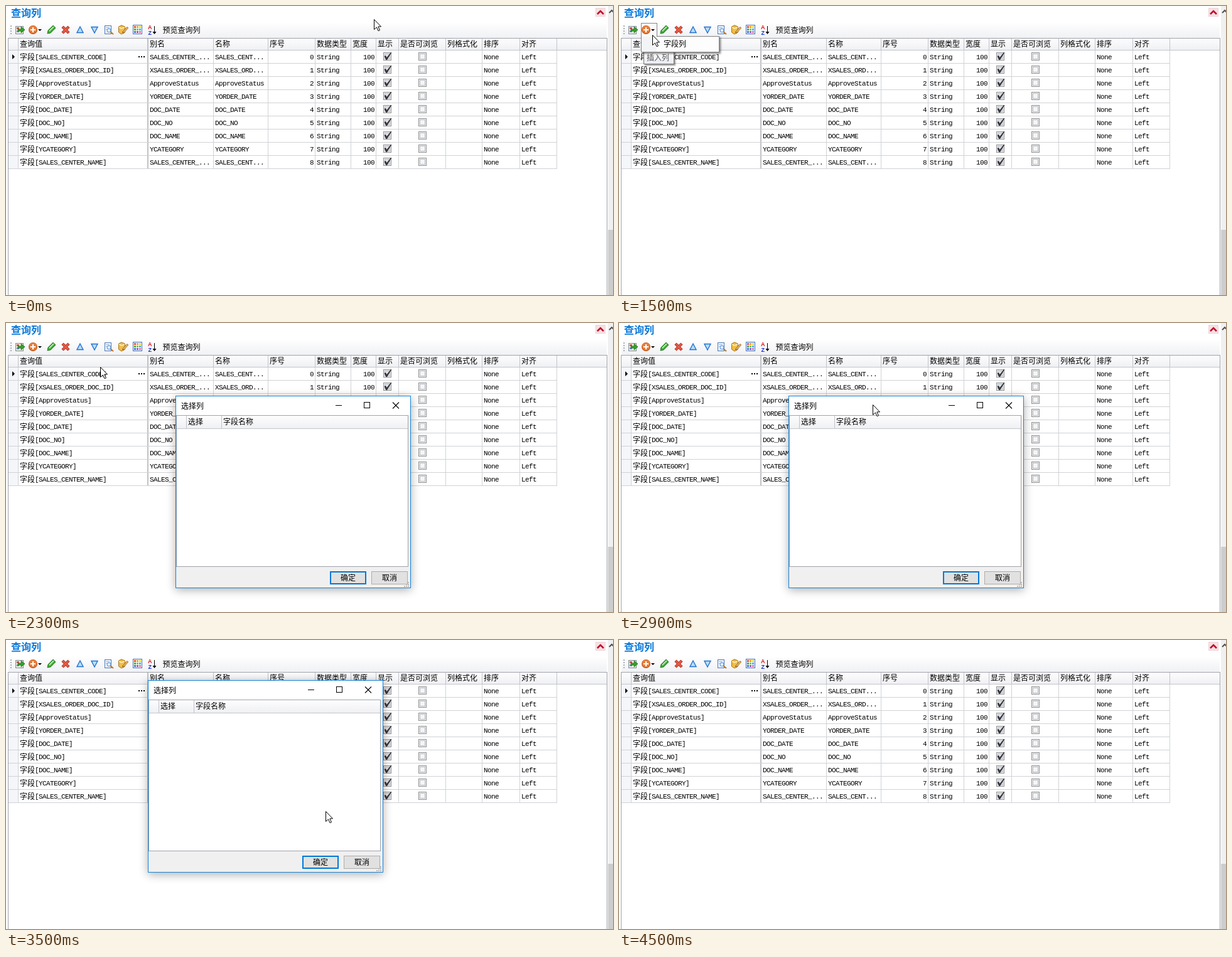
Recreate the animation shown at these times as an HTML page with a canvas. Size 967 by 461 pixels, loop 5.1 s.

```html
<!DOCTYPE html>
<html lang="zh">
<head>
<meta charset="utf-8">
<style>
html, body { margin: 0; width: 100%; height: 100%; overflow: hidden; background: #fff; }
canvas { display: block; }
</style>
</head>
<body>
<canvas id="stage" width="967" height="461"></canvas>
<script>
const LOOP = 5100, STEP = 100;
const CJK = '"Noto Sans CJK SC", "Noto Sans CJK", sans-serif';
const MONO = '"Liberation Mono", monospace';
const COLS = [19, 225, 330, 417, 492, 549, 589, 625, 700, 758, 818, 877];
const HEADS = ['查询值', '别名', '名称', '序号', '数据类型', '宽度', '显示', '是否可浏览', '列格式化', '排序', '对齐'];
const FIELDS = ['SALES_CENTER_CODE', 'XSALES_ORDER_DOC_ID', 'ApproveStatus', 'YORDER_DATE', 'DOC_DATE',
  'DOC_NO', 'DOC_NAME', 'YCATEGORY', 'SALES_CENTER_NAME'];

// Pointer stops: time, x, y
const POINTER = [
  [0, 586, 21], [100, 420, 26], [200, 150, 36], [300, 42, 39],
  [1400, 47, 42], [1500, 53, 46], [1600, 62, 51], [1700, 74, 56], [1800, 82, 58],
  [2300, 150, 70], [2400, 290, 92], [2500, 386, 107], [2600, 395, 116], [2800, 400, 124], [2900, 404, 130],
  [3000, 376, 92], [3100, 360, 78], [3300, 399, 99], [3400, 580, 170], [3500, 509, 273], [3600, 497, 313],
  [3700, 498, 335], [3800, 500, 341], [4100, 610, 310], [4200, 740, 265], [4300, 860, 225], [4400, 942, 200],
  [4500, 980, 190]
];

const stage = document.getElementById('stage').getContext('2d');
let ctx = stage;

const clamp = v => Math.max(0, Math.min(1, v));

function rect(x, y, w, h, color) {
  ctx.fillStyle = color;
  ctx.fillRect(x, y, w, h);
}

function box(x, y, w, h, border, fill, line = 1) {
  rect(x, y, w, h, border);
  rect(x + line, y + line, w - 2 * line, h - 2 * line, fill);
}

function shade(y, h, from, to) {
  const g = ctx.createLinearGradient(0, y, 0, y + h);
  g.addColorStop(0, from);
  g.addColorStop(1, to);
  return g;
}

function poly(points, fill, stroke, width = 1, closed = true) {
  ctx.beginPath();
  for (let i = 0; i < points.length; i += 2) ctx.lineTo(points[i], points[i + 1]);
  if (closed) ctx.closePath();
  if (fill) { ctx.fillStyle = fill; ctx.fill(); }
  if (stroke) { ctx.strokeStyle = stroke; ctx.lineWidth = width; ctx.stroke(); }
}

const path = (points, stroke, width) => poly(points, null, stroke, width, false);

function disc(x, y, r, fill) {
  ctx.beginPath();
  ctx.arc(x, y, r, 0, 7);
  ctx.fillStyle = fill;
  ctx.fill();
}

function write(s, x, y, font, color, align = 'left', spacing = '0px') {
  ctx.font = font;
  ctx.fillStyle = color;
  ctx.textAlign = align;
  ctx.textBaseline = 'alphabetic';
  ctx.letterSpacing = spacing;
  ctx.fillText(s, x, y);
}

const label = (s, x, y, color = '#000', align) => write(s, x, y + 4.5, '12px ' + CJK, color, align);
const code = (s, x, y) => write(s, x, y + 4, '11px ' + MONO, '#000', 'left', '-0.6px');
const codeRight = (s, x, y) => code(s, x - 6 * s.length, y);
const shorten = (s, n) => s.length > n ? s.slice(0, n - 3) + '...' : s;

function shadowed(blur, dx, dy, color, draw) {
  ctx.save();
  ctx.shadowBlur = blur;
  ctx.shadowOffsetX = dx;
  ctx.shadowOffsetY = dy;
  ctx.shadowColor = color;
  draw();
  ctx.restore();
}

function pencil(x, y, body, edge) {
  poly([x, y + 13, x + 1, y + 8, x + 9, y, x + 13, y + 4, x + 5, y + 12], body, edge);
  path([x + 3, y + 9, x + 10, y + 2], '#d8f5d0', 1.5);
}

function insertIcon() {
  disc(43, 38, 7, '#c8561c');
  disc(43, 37.5, 6, '#e8813c');
  rect(39, 37, 8, 2, '#fff');
  rect(42, 34, 2, 8, '#fff');
  poly([51, 37, 57, 37, 54, 40], '#000');
}

function toolbar() {
  rect(4, 27, 953, 24, shade(27, 24, '#fefefe', '#f0f1f4'));
  for (let y = 31; y < 46; y += 4) rect(7, y, 2, 2, '#a9adb5');

  box(15, 32, 13, 13, '#7d8793', '#f7f3e2');
  rect(17, 34, 4, 3, '#c9584d');
  rect(17, 39, 4, 3, '#5b8fd0');
  poly([19, 37, 24, 37, 24, 33, 30, 38, 24, 43, 24, 40, 19, 40], '#35a02c', '#1d6f1a', .8);

  insertIcon();
  pencil(66, 31, '#42ab3b', '#237a22');

  path([90, 33, 100, 43], '#a82c1c', 4.5);
  path([100, 33, 90, 43], '#a82c1c', 4.5);
  path([90.5, 33.5, 99.5, 42.5], '#e85a47', 2.5);
  path([99.5, 33.5, 90.5, 42.5], '#e85a47', 2.5);

  poly([118, 33, 123, 42.5, 113, 42.5], '#b9defa', '#2372cf', 1.4);
  poly([141, 43, 146, 33.5, 136, 33.5], '#b9defa', '#2372cf', 1.4);

  box(157, 31, 11, 14, '#4a77b5', '#f4f9ff');
  rect(159, 34, 6, 1, '#8fb0da');
  rect(159, 37, 4, 1, '#8fb0da');
  disc(164, 39, 3.5, '#6d9ed8');
  disc(164, 39, 2.3, '#e4f2ff');
  path([166.5, 41.5, 171, 45], '#b5711c', 2);

  rect(180, 33, 9, 10, '#eeb63d');
  poly([179.5, 33, 184, 30.8, 189.5, 33, 189.5, 42, 184, 45, 179.5, 42], '#f0bd49', '#a87416');
  path([180, 34, 184, 36, 189, 34], '#fff0b8', 1.5);
  path([186, 43, 194, 34], '#8d5a22', 3);
  path([187, 42, 193.5, 34.5], '#ffcb6d', 1.4);

  box(202, 30, 15, 15, '#3d6fc0', '#fff');
  const tiles = ['#e64b3c', '#f3a02c', '#f3d32c', '#4aa83e', '#7cc957', '#44b5d8', '#3c72d8', '#9a58c6', '#e070aa'];
  tiles.forEach((c, i) => rect(204 + i % 3 * 4, 32 + (i / 3 | 0) * 4, 3, 3, c));

  write('A', 226, 37, 'bold 9px "Liberation Sans", sans-serif', '#e01818');
  write('Z', 226.5, 46, 'bold 9px "Liberation Sans", sans-serif', '#1a2fd6');
  rect(236, 32, 1, 12, '#000');
  poly([233.5, 41, 239.5, 41, 236.5, 45], '#000');

  label('预览查询列', 249.5, 38);
}

function checkbox(x, y, on) {
  box(x, y, 13, 13, '#8e8f8f', '#f4f4f4');
  box(x + 2, y + 2, 9, 9, '#b8bcc2', on ? '#e2e4e8' : '#f4f5f6');
  if (on) poly([x + 1.5, y + 6, x + 4, y + 5, x + 5.5, y + 8, x + 12, y, x + 13.5, y, x + 6, y + 12, x + 4.5, y + 12], '#33343c');
}

function grid() {
  rect(3, 51, 955, 1, '#a0a3aa');
  rect(3, 51, 1, 410, '#a0a3aa');
  rect(957, 51, 1, 410, '#a0a3aa');
  rect(4, 52, 953, 18, shade(52, 18, '#fdfdfe', '#eff0f3'));
  rect(4, 70, 953, 1, '#c3c6cc');
  rect(4, 71, 15, 189, '#f4f6f9');
  COLS.forEach(x => rect(x, 52, 1, 208, '#d0d2d6'));
  COLS.forEach(x => rect(x, 52, 1, 19, '#c0c3c9'));
  rect(225, 52, 2, 208, '#c0c2c7');
  HEADS.forEach((s, i) => label(s, COLS[i] + 3 + (i === 1), 60));

  FIELDS.forEach((field, i) => {
    const y = 81 + 21 * i;
    rect(4, y + 10, 874, 1, '#d0d2d6');
    label('字段', 22, y);
    code(`[${field}]`, 46, y);
    code(shorten(field, 16), 229, y);
    code(shorten(field, 13), 333, y);
    codeRight(String(i), 490, y);
    code('String', 495, y);
    codeRight('100', 587, y);
    checkbox(601, y - 7, true);
    checkbox(657, y - 7, false);
    code('None', 761, y);
    code('Left', 821, y);
  });
  poly([10, 77, 14, 81, 10, 85], '#000');
  for (let x = 211; x < 221; x += 4) rect(x, 80, 2, 2, '#000');
}

function page() {
  rect(0, 0, 967, 461, '#fff');
  write('查询列', 8, 17, 'bold 16px ' + CJK, '#0878d8');
  box(939, 3, 16, 14, '#ecd3d8', '#f6e0e4');
  path([942, 13, 947, 8, 952, 13], '#c00d28', 2.6);
  rect(959, 0, 8, 461, '#f0f0f0');
  rect(959, 357, 8, 104, '#cdcdcd');
  path([961, 11, 965, 7, 969, 11], '#505050', 2);
  toolbar();
  grid();
}

function drawDialog() {
  shadowed(14, 0, 3, 'rgba(0,0,0,.32)', () => rect(0, 0, 375, 307, '#fff'));
  box(0, 0, 375, 307, '#1883d7', '#fff');
  label('选择列', 9, 16);
  rect(255, 15, 10, 1, '#000');
  box(300, 10, 10, 10, '#000', '#fff');
  path([346, 10.5, 356, 20.5], '#000', 1.1);
  path([356, 10.5, 346, 20.5], '#000', 1.1);
  rect(1, 31, 373, 275, '#f0f0f0');
  box(1, 31, 370, 242, '#a0a3aa', '#fff');
  rect(2, 32, 368, 20, shade(32, 20, '#fdfdfe', '#eff0f3'));
  rect(2, 52, 368, 1, '#c3c6cc');
  rect(17, 32, 1, 20, '#c0c3c9');
  rect(73, 32, 1, 20, '#c0c3c9');
  label('选择', 20, 41);
  label('字段名称', 76, 41);
  box(246, 280, 58, 21, '#0078d7', '#e1e1e1', 2);
  box(312, 280, 58, 21, '#adadad', '#e1e1e1');
  label('确定', 275, 290, '#000', 'center');
  label('取消', 341, 290, '#000', 'center');
  for (let i = 0; i < 3; i++)
    for (let j = 0; j <= i; j++) rect(370 - 3 * j, 297 + 3 * i, 2, 2, '#b8b8b8');
}

// Paints once into its own canvas so that it can fade as a whole
function sheet(w, h, pad, draw) {
  const c = document.createElement('canvas');
  c.width = w + 2 * pad;
  c.height = h + 2 * pad;
  ctx = c.getContext('2d');
  ctx.translate(pad, pad);
  draw();
  ctx = stage;
  return c;
}

const dialogSheet = sheet(375, 307, 30, drawDialog);
const pageSheet = sheet(967, 461, 0, page);
const tipSheet = sheet(49, 22, 6, () => {
  shadowed(2, 2, 2, 'rgba(0,0,0,.4)', () => rect(0, 0, 49, 22, '#767676'));
  box(0, 0, 49, 22, '#767676', shade(0, 22, '#fff', '#e8e9f1'));
  label('插入列', 5, 11, '#575757');
});

function stamp(image, x, y, alpha, scale = 1) {
  const w = image.width * scale, h = image.height * scale;
  ctx.globalAlpha = alpha;
  ctx.drawImage(image, x + (image.width - w) / 2, y + (image.height - h) / 2, w, h);
  ctx.globalAlpha = 1;
}

function menu(t) {
  ctx.globalAlpha = clamp((t - 1000) / 200);
  shadowed(3, 2, 2, 'rgba(0,0,0,.5)', () => rect(35, 48, 125, 26, '#858585'));
  box(35, 48, 125, 26, '#858585', '#fdfdfd');
  rect(36, 49, 24, 24, '#f3f4f6');
  if (t >= 1600) box(37, 50, 121, 22, '#3c9be8', '#c3def6');
  label('字段列', 71, 60);
  box(35, 27, 26, 22, '#858585', '#fafafb');
  rect(36, 48, 24, 1, '#fafafb');
  insertIcon();
  ctx.globalAlpha = 1;
}

function dialog(t) {
  const opening = clamp((t - 2000) / 300), closing = clamp((t - 3900) / 300);
  const shown = (1 - (1 - opening) ** 2) * (1 - closing);
  const [dx, dy] = t < 3000 ? [0, 0] : t < 3100 ? [-28, -38] : [-44, -52];
  if (shown > 0) stamp(dialogSheet, 240 + dx, 86 + dy, shown, .93 + .07 * shown);
}

function pointer(t) {
  const [, x, y] = POINTER.findLast(p => p[0] <= t);
  ctx.save();
  ctx.translate(x + .5, y + .5);
  poly([0, 0, 0, 16, 4, 12.4, 6.6, 18.2, 9, 17.2, 6.4, 11.4, 11, 11.4], '#fff', '#000');
  ctx.restore();
}

function render(t) {
  stamp(pageSheet, 0, 0, 1);
  if (t >= 300 && t < 2000) {
    box(35, 27, 26, 22, '#3c93dd', '#bcd9f3');
    insertIcon();
  }
  stamp(tipSheet, 33, 65, clamp((t - 600) / 300) * clamp((1800 - t) / 300));
  if (t > 1000 && t < 2000) menu(t);
  dialog(t);
  pointer(t);
}

function tick() {
  render(Math.floor(performance.now() % LOOP / STEP) * STEP);
  requestAnimationFrame(tick);
}
tick();
</script>
</body>
</html>
```
